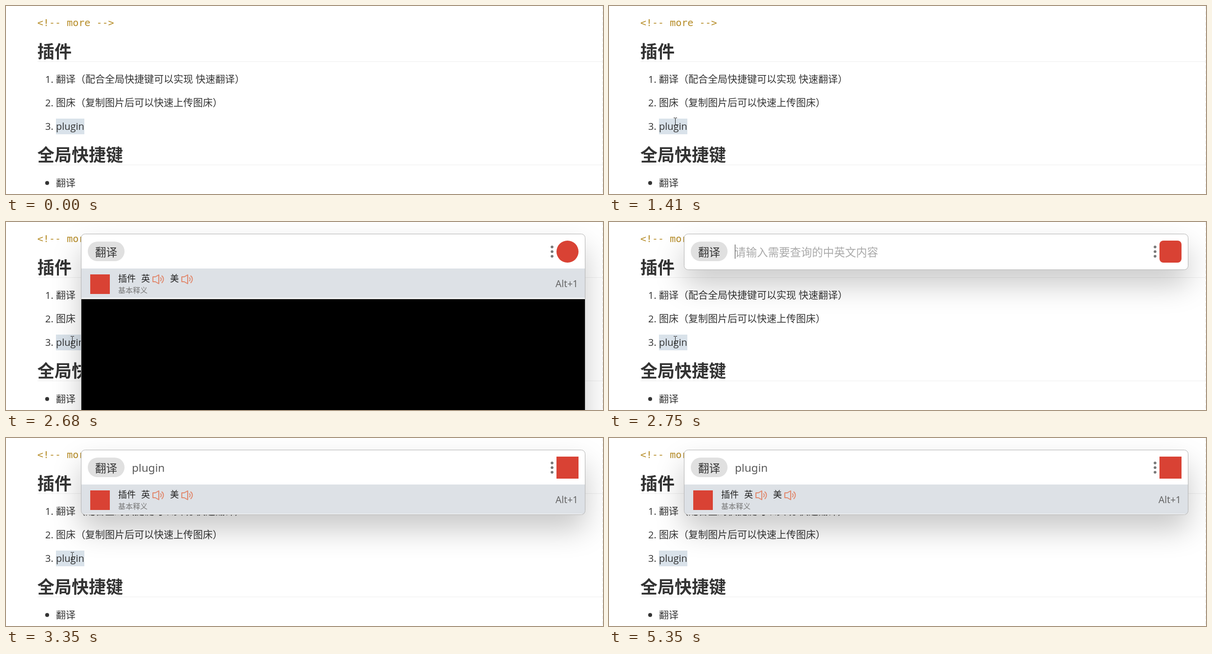
Recreate the animation shown at these times as an HTML page with a canvas. Size 1219 px wide and 384 px high, loop 5410 ms.

```html
<!DOCTYPE html>
<html lang="zh-CN">
<head>
<meta charset="utf-8">
<title>插件</title>
<style>
html, body { margin: 0; width: 100%; height: 100%; overflow: hidden; background: #fff; }
canvas { display: block; }
</style>
</head>
<body>
<canvas id="stage" width="1219" height="384"></canvas>
<script>
const W = 1219, H = 384, LOOP = 5410;
const ctx = document.getElementById('stage').getContext('2d');
const CJK = '"Noto Sans CJK SC", "Noto Sans CJK", sans-serif';
const BODY = '"Open Sans", ' + CJK;
const UI = '"Noto Sans", ' + CJK;
const RED = '#d94234';

// Pointer hops: [time, x, y]; no position means hidden.
const POINTER = [
  [0], [190, 296, 310], [260, 205, 287], [330, 96, 257], [390, 28, 230],
  [460, 13, 217], [530, 44, 222], [590, 82, 228], [660, 105, 231],
  [740, 116, 235], [810, 128, 239], [880, 135, 241], [1410, 135, 236],
  [1480, 135, 233], [1610, 135, 239], [1680, 135, 241],
  [4350, 290, 283], [4420, 611, 346], [4490]
];

const within = (t, a, b) => t >= a && t < b;

function text(str, x, y, font, color) {
  ctx.font = font;
  ctx.fillStyle = color;
  ctx.fillText(str, x, y);
}

function box(x, y, w, h, color) {
  ctx.fillStyle = color;
  ctx.fillRect(x, y, w, h);
}

function rounded(x, y, w, h, r) {
  ctx.beginPath();
  ctx.roundRect(x, y, w, h, r);
}

function dot(x, y, r, color) {
  ctx.fillStyle = color;
  ctx.beginPath();
  ctx.arc(x, y, r, 0, Math.PI * 2);
  ctx.fill();
}

function heading(str, y) {
  text(str, 64, y, 'bold 35px ' + CJK, '#333');
  box(64, y + 7, W - 64, 1, '#eeeeee');
}

function item(mark, str, y) {
  text(mark, 80, y, '20px ' + BODY, '#333');
  text(str, 102, y, '20px ' + BODY, '#333');
}

function page(selected) {
  box(0, 0, W, H, '#fff');
  for (let y = 0; y < H; y += 11) box(1218, y, 1, 7, '#e4e4e4');
  text('<!-- more -->', 64, 41, '20px "DejaVu Sans Mono", monospace', '#b58b25');
  heading('插件', 106);
  item('1.', '翻译（配合全局快捷键可以实现 快速翻译）', 157);
  item('2.', '图床（复制图片后可以快速上传图床）', 205);
  if (selected) box(102, 230, 58, 32, '#d9e2ea');
  item('3.', 'plugin', 253);
  heading('全局快捷键', 317);
  dot(84, 361.5, 4, '#333');
  item('', '翻译', 369);
}

function speaker(x, y) {
  ctx.strokeStyle = '#e08a70';
  ctx.lineWidth = 2;
  ctx.lineJoin = 'round';
  ctx.beginPath();
  ctx.moveTo(x, y - 5);
  ctx.lineTo(x + 5, y - 5);
  ctx.lineTo(x + 12, y - 9);
  ctx.lineTo(x + 12, y + 9);
  ctx.lineTo(x + 5, y + 5);
  ctx.lineTo(x, y + 5);
  ctx.closePath();
  ctx.stroke();
  for (const r of [4.5, 9]) {
    ctx.beginPath();
    ctx.arc(x + 12.5, y, r, -0.95, 0.95);
    ctx.stroke();
  }
}

function resultRow() {
  box(154, 95, 1028, 60, '#dde1e6');
  box(172, 107, 40, 40, RED);
  const font = '18px ' + CJK;
  text('插件', 229, 121.5, font, '#222');
  text('英', 276, 121.5, font, '#222');
  text('美', 335, 121.5, font, '#222');
  speaker(300, 117);
  speaker(359, 117);
  text('基本释义', 229, 144.5, '300 15px ' + CJK, '#777');
  text('Alt+1', 1122, 133, '300 19.2px ' + UI, '#666');
}

function panel(t) {
  const stale = t < 2750;
  const results = stale || t >= 3350;
  const typed = t >= 2820;
  const h = stale ? 400 : results ? 132 : 73;

  ctx.save();
  ctx.shadowColor = 'rgba(0,0,0,.22)';
  ctx.shadowBlur = 60;
  ctx.shadowOffsetY = 30;
  rounded(153.5, 24.5, 1029, h, 8);
  ctx.fillStyle = '#fff';
  ctx.fill();
  ctx.restore();

  ctx.save();
  ctx.clip();
  if (results) resultRow();
  if (stale) box(154, 157.5, 1028, 300, '#000');
  ctx.restore();
  rounded(153.5, 24.5, 1029, h, 8);
  ctx.strokeStyle = '#b4b4b4';
  ctx.lineWidth = 1;
  ctx.stroke();

  rounded(167, 40, 75, 40, 20);
  ctx.fillStyle = '#e0e0e0';
  ctx.fill();
  text('翻译', 182, 69.5, '22.5px ' + CJK, '#333');
  if (typed) text('plugin', 257, 69, '22.5px ' + UI, '#5a5a5a');
  else if (!stale) text('请输入需要查询的中英文内容', 257, 69.5, '300 22.5px ' + CJK, '#aaa');

  const blink = within(t, 2750, 3300) || within(t, 3830, 4350) || within(t, 4890, 5350);
  if (blink) box(typed ? 325 : 257, 46, 1, 29, '#333');

  for (const y of [51, 60.5, 70]) dot(1115, y, 2.8, '#777');
  const corner = stale ? 22.5 : t < 2820 ? 8 : t < 2880 ? 3 : t < 2950 ? 1 : 0;
  rounded(1124, 38, 45, 45, corner);
  ctx.fillStyle = RED;
  ctx.fill();
}

function pointer(t) {
  const [, x, y] = POINTER.filter(p => p[0] <= t).pop();
  if (x === undefined) return;
  box(x, y - 7, 1, 14, '#222');
  for (const edge of [y - 8, y + 7]) {
    box(x - 3, edge, 3, 1, '#222');
    box(x + 1, edge, 3, 1, '#222');
  }
}

function draw(t) {
  const selected = !within(t, 1480, 1680);
  page(selected);
  if (t >= 2680) panel(t);
  pointer(t);
}

const start = performance.now();
function tick() {
  draw((performance.now() - start) % LOOP);
  requestAnimationFrame(tick);
}
tick();
</script>
</body>
</html>
```
